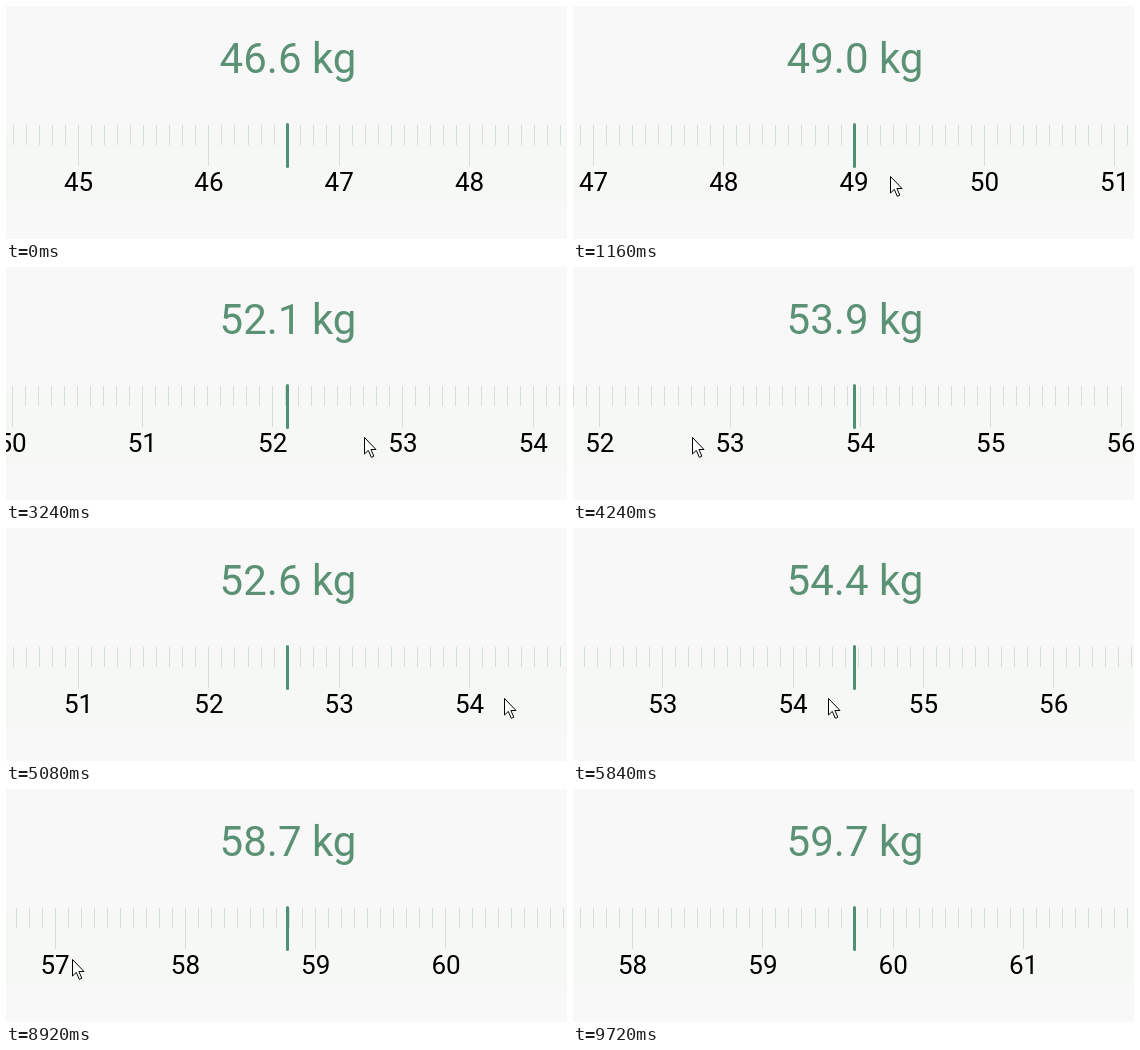
Write an HTML page with a canvas that moves like this. It is 561 px wide and 233 px high and loops after 10 s.

```html
<!DOCTYPE html>
<html lang="en">
<head>
<meta charset="utf-8">
<title>Weight ruler</title>
<style>
  html, body { margin: 0; width: 100%; height: 100%; overflow: hidden; background: #f8f8f8; }
  canvas { display: block; }
</style>
</head>
<body>
<canvas id="stage" width="561" height="233"></canvas>
<script>
const ctx = document.getElementById('stage').getContext('2d');
const W = 561, H = 233, LOOP = 10000;
const CENTER = 281.1, KG = 130.3;
const AWAY = { x: 600, y: 30 };
const DRAG_Y = 170, LEFT_LIMIT = 66, GLIDE = 450;

// Each drag: start time, end time, weight reached, pointer x at the grab
const drags = [
  [160, 1040, 49, 413],
  [1240, 2080, 51.5, 431],
  [2700, 4380, 54, 438],
  [4560, 5040, 52.6, 316],
  [5200, 5960, 54.6, 498],
  [6240, 6920, 56.2, 388],
  [8320, 9225, 59.7, 401]
];

const mix = (a, b, u) => a + (b - a) * u;

function ease(t, from, to) {
  const u = Math.min(1, Math.max(0, (t - from) / (to - from)));
  return u * u * (3 - 2 * u);
}

// The pointer glides to each grab point, then moves together with the ruler
function pose(t) {
  let weight = 46.6, { x, y } = AWAY, free = 0;
  for (const [start, end, goal, grab] of drags) {
    const reach = ease(t, Math.max(free, start - GLIDE), start);
    const next = mix(weight, goal, ease(t, start, end));
    x = Math.max(LEFT_LIMIT, mix(x, grab, reach) - (next - weight) * KG);
    y = mix(y, DRAG_Y, reach);
    weight = next;
    free = end;
  }
  const leave = ease(t, 9400, 9720);
  return { weight, x: mix(x, AWAY.x, leave), y: mix(y, AWAY.y, leave) };
}

const tint = ctx.createLinearGradient(0, 112, 0, 208);
tint.addColorStop(0, '#f8f8f8');
tint.addColorStop(0.25, '#f6f8f5');
tint.addColorStop(0.8, '#f6f8f5');
tint.addColorStop(1, '#f8f8f8');

function text(label, x, y, size, color) {
  ctx.font = `${size}px Roboto, sans-serif`;
  ctx.textAlign = 'center';
  ctx.fillStyle = color;
  ctx.fillText(label, x, y);
}

function drawRuler(weight) {
  const first = Math.ceil((weight - CENTER / KG) * 10);
  for (let n = first; ; n++) {
    const x = CENTER + (n / 10 - weight) * KG;
    if (x > W) break;
    const major = n % 10 === 0;
    ctx.fillStyle = '#d5dfd9';
    ctx.fillRect(Math.floor(x), 119, 1, major ? 41 : 20);
    if (major) text(n / 10, x, 185, 26, '#000');
  }
  ctx.fillStyle = '#4f8f73';
  ctx.beginPath();
  ctx.roundRect(280, 117, 3, 45, 1.5);
  ctx.fill();
}

const arrow = new Path2D('M.5 .5V17L4.3 13.4 7.3 20.3 9.8 19.2 6.9 12.5H12Z');

function drawPointer(x, y) {
  ctx.save();
  ctx.translate(Math.round(x), Math.round(y));
  ctx.fillStyle = '#fff';
  ctx.fill(arrow);
  ctx.strokeStyle = '#000';
  ctx.stroke(arrow);
  ctx.restore();
}

function draw(t) {
  const { weight, x, y } = pose(t);
  ctx.fillStyle = '#f8f8f8';
  ctx.fillRect(0, 0, W, H);
  ctx.fillStyle = tint;
  ctx.fillRect(0, 112, W, 96);
  const shown = Math.floor(weight * 10 + 1e-6) / 10;
  text(shown.toFixed(1) + ' kg', 282, 67, 42, '#5b9175');
  drawRuler(weight);
  drawPointer(x, y);
}

const start = performance.now();
function tick() {
  draw((performance.now() - start) % LOOP);
  requestAnimationFrame(tick);
}
tick();
</script>
</body>
</html>
```
